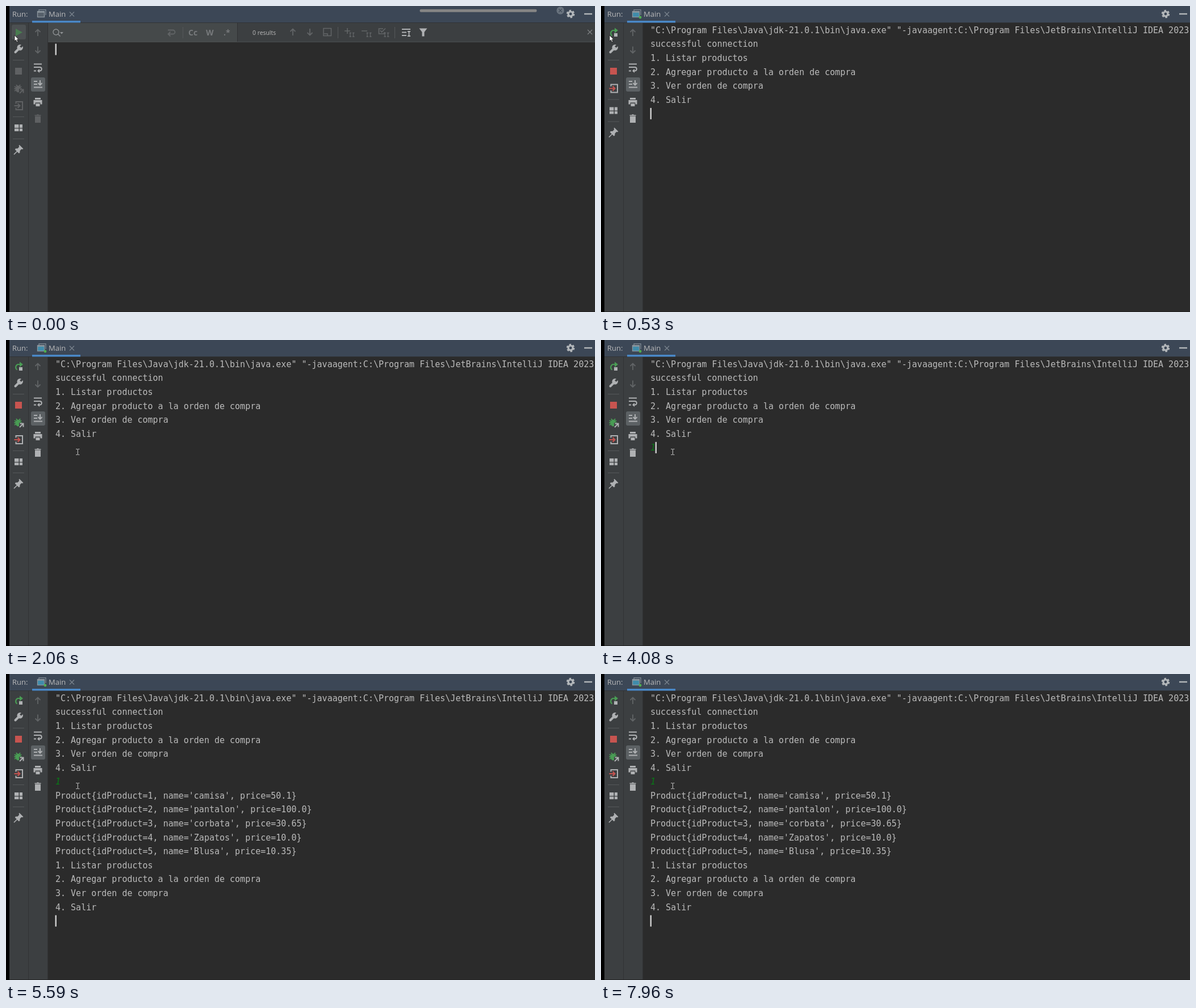
An HTML page that plays this animation: 1037 by 540 pixels, repeating every 8 s.

```html
<!DOCTYPE html>
<html lang="en">
<meta charset="utf-8">
<title>Run console</title>
<style>
  html, body { margin: 0; width: 100%; height: 100%; overflow: hidden; background: #2b2b2b }
  svg { display: block; width: 100%; height: 100%; --red: #c75450; --green: #499c54; --icon: #afb1b3; --frame: #3f8cab }
  svg.idle { --red: #5f6163; --green: #5f6163; --icon: #5f6163; --frame: #56606b }
  text { font: 13px "Open Sans", "Noto Sans", sans-serif; fill: #bbb; white-space: pre }
  #log text { font: 15px "DejaVu Sans Mono", monospace }
  #log .typed { fill: #087a16; font-style: italic }
  .f { fill: #afb1b3 }
  .s { fill: none; stroke: #afb1b3; stroke-width: 2 }
  .dim { fill: none; stroke: #626567; stroke-width: 1.8 }
  .rule { stroke: #55585a; fill: none }
  .bold { font-weight: 700; font-size: 14px; fill: #777a7c }
</style>
<svg id="stage" viewBox="0 0 1037 540" preserveAspectRatio="none">
  <defs>
    <path id="up" d="M0 6V-5M-4.5 -1L0 -5.5L4.5 -1"/>
    <path id="x" d="M-4 -4L4 4M4 -4L-4 4"/>
  </defs>
  <rect width="1037" height="540" fill="#2b2b2b"/>
  <rect x="6" width="1031" height="29" fill="#3c4756"/>
  <rect x="6" y="29" width="68" height="511" fill="#3c3f41"/>
  <path d="M6 29.5H1037M39.5 30V540M73.5 30V540" stroke="#313335"/>
  <rect y="539" width="1037" height="1" fill="#232323"/>
  <rect width="6" height="540" fill="#000"/>

  <!-- header -->
  <text x="11" y="19">Run:</text>
  <text x="75" y="19">Main</text>
  <rect x="46" y="26" width="85" height="3.5" fill="#4a88c7"/>
  <path d="M58 9V6.7H70V16" fill="none" stroke="#7f8a94" stroke-width="1.3"/>
  <rect x="55.5" y="9.5" width="12" height="10" fill="var(--frame)" stroke="#8b959d" stroke-width="1.3"/>
  <path d="M55 10.7H68" stroke="#8b959d" stroke-width="2"/>
  <circle id="live" cx="69" cy="20" r="2.4" fill="#4fae50"/>
  <use href="#x" x="116" y="14.5" stroke="#7b858f" stroke-width="1.2"/>
  <g fill="none" stroke="#b3b7ba">
    <circle cx="994" cy="14" r="4" stroke-width="3.2"/>
    <circle cx="994" cy="14" r="6" stroke-width="2.6" stroke-dasharray="3.4 2.88"/>
  </g>
  <rect x="1018" y="12.8" width="14" height="2.4" fill="#b3b7ba"/>

  <!-- run toolbar -->
  <g id="play">
    <rect x="10" y="33" width="25" height="26" rx="3" fill="#4c5052"/>
    <path d="M17 40L29 46.5L17 53Z" fill="#497d50"/>
  </g>
  <g id="rerun">
    <path d="M19.5 52.6A5.4 5.4 0 0 1 21 43H25" fill="none" stroke="#499c54" stroke-width="2.2"/>
    <path d="M24 38.5L30 43L24 48Z" fill="#499c54"/>
    <rect class="f" x="23" y="48" width="6" height="6"/>
  </g>
  <path d="M16.5 81.5L23 75" class="s" style="stroke-width:4;stroke-linecap:round"/>
  <circle class="f" cx="24.7" cy="73.3" r="5.2"/>
  <path d="M25.5 72.5L31 67" stroke="#3c3f41" stroke-width="3.8"/>
  <path class="rule" d="M12 95.5H32"/>
  <rect x="16" y="109" width="12" height="12" fill="var(--red)"/>
  <g id="bug">
    <path d="M15 142L27 150M15 150L27 142M14.5 146H28M18 139L20 142M25 139L23 142" stroke="var(--green)" stroke-width="2"/>
    <ellipse cx="21.3" cy="146.5" rx="4.3" ry="6" fill="var(--green)"/>
    <path d="M23 146H31V154H23Z" fill="#3c3f41"/>
    <path d="M24.5 147.5H30.5V153.5M30 148L24 154" fill="none" stroke="var(--icon)" stroke-width="2"/>
  </g>
  <g id="exit" fill="none" stroke-width="2">
    <path d="M17.5 172.5V169H29V183H17.5V179.5" stroke="var(--icon)"/>
    <path d="M14.5 176H24M20.5 172L24.5 176L20.5 180" stroke="var(--red)"/>
  </g>
  <g id="tail">
    <path class="rule" d="M12 195.5H32M12 234.5H32"/>
    <path class="f" d="M15 209H22.5V215H15ZM24 209H29V215H24ZM15 216.3H22.5V221H15ZM24 216.3H29V221H24Z"/>
    <path class="f" d="M23.5 245L30.5 252L28.8 253L27.2 252.5L24.5 255.5L24.3 259L22.6 260L15.8 253.2L17 251.6L20.4 251.4L23.3 248.6L22.6 246.5Z"/>
    <path class="s" d="M14 262L20 256" style="stroke-width:1.6"/>
  </g>

  <!-- console toolbar -->
  <use href="#up" x="56" y="47" class="dim"/>
  <use href="#up" transform="translate(56 77.5) scale(1 -1)" class="dim"/>
  <path class="s" d="M49 102.5H63M49 108H60A3.3 3.3 0 0 1 60 114.5H56M49 114.5H53"/>
  <path class="f" d="M59 110.7V118L55 114.5Z"/>
  <rect x="44" y="126" width="25" height="25" rx="3" fill="#5c6164"/>
  <path class="s" d="M49 133H55M49 138H55M49 143.5H64M60 131V139M56.5 136L60 139.5L63.5 136"/>
  <path class="f" d="M51 162H61V165H51ZM48.5 166H63.5V173.5H60.5V170.5H51.5V173.5H48.5ZM52.5 172H59.5V177H52.5Z"/>
  <path id="trash" d="M51 194.5H61V206H51ZM50.5 192.3H54L54.8 191.2H57.2L58 192.3H61.5V193.7H50.5Z" fill="var(--icon)"/>

  <!-- search bar and progress, shown before launch -->
  <g id="find">
    <rect x="74" y="30" width="963" height="33" fill="#3c3f41"/>
    <rect x="74" y="30" width="333" height="33" fill="#45494a"/>
    <path d="M74 63.5H1037" stroke="#4b4e50"/>
    <path d="M407.5 30V63" stroke="#303234"/>
    <path class="rule" d="M311.5 37V57M584.5 37V57M684.5 37V57"/>
    <g fill="none" stroke="#8f9294" stroke-width="1.4">
      <circle cx="88" cy="46" r="5"/><path d="M91.5 49.5L95.5 53.5"/>
    </g>
    <path d="M95 46H101L98 49.5Z" fill="#8f9294"/>
    <path class="dim" d="M285 42.5H294A3 3 0 0 1 294 49.5H286M289.5 45.5L285.5 49.5L289.5 53.5"/>
    <text class="bold" x="321" y="52">Cc</text>
    <text class="bold" x="352" y="52">W</text>
    <text class="bold" x="383" y="52">.*</text>
    <text x="434" y="51.3" style="font-size:10.4px">0 results</text>
    <use href="#up" x="505" y="46" class="dim"/>
    <use href="#up" transform="translate(535 46) scale(1 -1)" class="dim"/>
    <path class="dim" style="stroke-width:1.5" d="M559 39.5H572.5V52.5H559ZM560 49H566V52"/>
    <path class="dim" style="stroke-width:1.6" d="M596 44H606M601 39V49M626 44H636M664 40H656.5V49H666V46M659 43L661.5 46L668 39.5"/>
    <path class="dim" style="stroke-width:1.3" d="M606 47.5V54M611.5 47.5V54M604.5 47.5H608M610 47.5H613.5M604.5 54H608M610 54H613.5M636 47.5V54M641.5 47.5V54M634.5 47.5H638M640 47.5H643.5M634.5 54H638M640 54H643.5M667 47.5V54M672.5 47.5V54M665.5 47.5H669M671 47.5H674.5M665.5 54H669M671 54H674.5"/>
    <path class="s" style="stroke-width:1.8" d="M697 41H712M697 46.5H705M697 52H705M709.5 45V53M707 45H712M707 53H712"/>
    <path class="f" d="M727.5 39.5H741.5L736.5 46V53.5H732.5V46Z"/>
    <use href="#x" x="1028" y="46" stroke="#7e8183" stroke-width="1.2"/>
    <rect x="728.5" y="5.7" width="206" height="5" rx="2.2" fill="#858585"/>
    <circle cx="976" cy="8" r="6.7" fill="#69737e"/>
    <use href="#x" transform="translate(976 8) scale(.7)" stroke="#3c4756" stroke-width="1.7"/>
  </g>

  <g id="log"></g>
  <rect id="caret" width="2.5" height="20" fill="#ccc"/>
  <path id="arrow" d="M0 0V10.5L2.4 8.4L4.2 12.3L6 11.5L4.3 7.7H7.5Z" fill="#fff" stroke="#111" stroke-width=".8"/>
  <path id="beam" d="M-3 -5H-1L0 -4.3L1 -5H3M0 -4.3V4.3M-3 5H-1L0 4.3L1 5H3" fill="none" stroke="#d0d0d0"/>
</svg>
<script>
const $ = id => document.getElementById(id);
const show = (id, on) => $(id).style.display = on ? '' : 'none';
const move = (id, x, y) => $(id).setAttribute('transform', `translate(${x} ${y})`);
const rowY = row => 42.4 + row * 24.58;

const menu = ['1. Listar productos', '2. Agregar producto a la orden de compra', '3. Ver orden de compra', '4. Salir'];
const products = [['camisa', '50.1'], ['pantalon', '100.0'], ['corbata', '30.65'], ['Zapatos', '10.0'], ['Blusa', '10.35']]
  .map(([name, price], i) => `Product{idProduct=${i + 1}, name='${name}', price=${price}}`);
const lines = [
  String.raw`"C:\Program Files\Java\jdk-21.0.1\bin\java.exe" "-javaagent:C:\Program Files\JetBrains\IntelliJ IDEA 2023`,
  'successful connection', ...menu, '1', ...products, ...menu
];
const INPUT = 6;
const rows = lines.map((line, i) => {
  const el = document.createElementNS('http://www.w3.org/2000/svg', 'text');
  el.textContent = line;
  el.setAttribute('x', 87);
  el.setAttribute('y', rowY(i) + 5.4);
  if (i === INPUT) el.setAttribute('class', 'typed');
  $('log').append(el);
  return el;
});
const appearsAt = i => i < 1 ? 200 : i < INPUT ? 530 : i === INPUT ? 4080 : 5590;

// caret: [start, row, column]; no row means blinked off
const caret = [
  [0, 1.39, 0], [70, 0, 0], [200, 1, 0], [530, 6, 0], [1010], [1530, 6, 0], [2060], [2520, 6, 0], [3050],
  [3520, 6, 0], [3980], [4080, 6, 1], [4990], [5320, 7, 0], [5590, 16, 0], [6510], [6970, 16, 0], [7510], [7960, 16, 0]
];

function draw(t) {
  const idle = t < 70, full = idle || t >= 1390, early = !idle && t < 530;
  $('stage').classList.toggle('idle', idle);
  ['find', 'play'].forEach(id => show(id, idle));
  ['live', 'rerun'].forEach(id => show(id, !idle));
  show('bug', full);
  show('exit', !early);
  move('exit', 0, full ? 0 : -30.5);
  move('tail', 0, full ? 0 : early ? -61 : -30.5);

  rows.forEach((el, i) => el.style.display = t >= appearsAt(i) ? '' : 'none');
  const [, row, col] = caret.findLast(c => c[0] <= t);
  show('caret', row !== undefined);
  if (row !== undefined) move('caret', 86.5 + col * 9.03, rowY(row) - 10);

  // pointer crosses to the console in six jumps
  const p = Math.min(6, Math.max(0, Math.floor((t - 1390) / 68) + 1)) / 6;
  const x = 15 + 111 * p, y = 51.5 + 146 * p;
  show('arrow', x < 74);
  show('beam', x >= 74);
  move('arrow', x, y);
  move('beam', x + .3, y);
}

function tick() {
  draw(performance.now() % 8000);
  requestAnimationFrame(tick);
}
tick();
</script>
</html>
```
